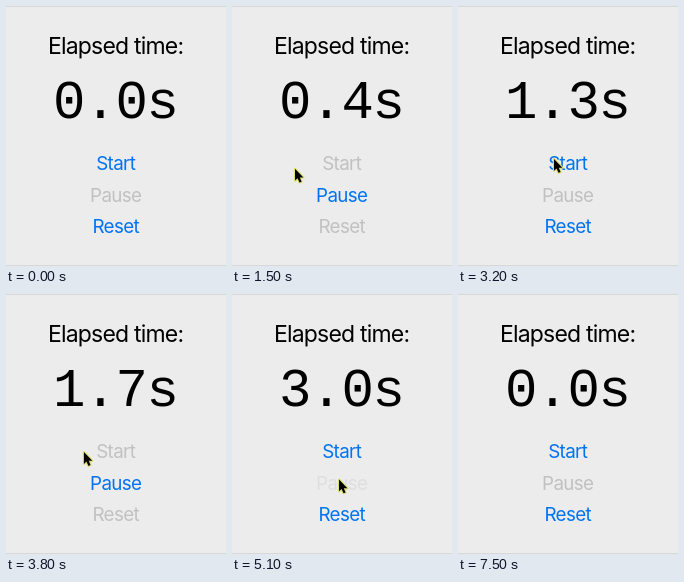
An HTML page for the animation above (7600 ms loop, 220 by 260 pixels).

```html
<!DOCTYPE html>
<html lang="en">
<head>
<meta charset="utf-8">
<title>Stopwatch</title>
<style>
  html, body { margin: 0; width: 100%; height: 100%; overflow: hidden; background: #ececec; }
  svg { display: block; width: 100%; height: 100%; }
  text { font-family: Inter, Roboto, sans-serif; font-optical-sizing: none; text-anchor: middle; }
  #title { font-size: 23px; letter-spacing: -0.8px; }
  #time { font-family: "Liberation Mono", "DejaVu Sans Mono", monospace; font-size: 54px; letter-spacing: -1.2px; }
  .button { font-size: 18.8px; letter-spacing: -0.65px; }
</style>
</head>
<body>
<svg viewBox="0 0 220 260">
  <rect width="220" height="260" fill="#ececec"/>
  <path d="M0 .5H220M0 259.5H220" stroke="#d8d8d8"/>
  <text id="title" x="109.6" y="48">Elapsed time:</text>
  <text id="time" x="109.4" y="112.3">0.0s</text>
  <text id="start" class="button" x="109.7" y="164">Start</text>
  <text id="pause" class="button" x="109.7" y="195.5">Pause</text>
  <text id="reset" class="button" x="109.7" y="227">Reset</text>
  <path id="cursor" d="M0 0V11.8L2.6 9.5 4.5 13.8 6.6 12.9 4.8 8.7H8.4Z"
        stroke="#dfdf70" stroke-width="2.2" stroke-linejoin="round" paint-order="stroke"/>
</svg>
<script>
const LOOP = 7600, STEP = 100;
const BLUE = '#0073f2', GRAY = '#c1c1c1';
const PRESS = 100, FADE = 400, PRESSED_OPACITY = 0.2;
const LEAVE_AFTER = 100, ARRIVE_BEFORE = 350;

// Pointer visits: release time, place, and how far the way there bows to the left.
const visits = [
  { at: 250, x: -18, y: 172 },
  { button: 'start', at: 1100, x: 98, y: 155, bow: 0 },
  { button: 'pause', at: 2450, x: 100, y: 185, bow: 41 },
  { button: 'start', at: 3400, x: 96, y: 153, bow: 8 },
  { button: 'pause', at: 5050, x: 107, y: 185.5, bow: 28 },
  { button: 'reset', at: 6050, x: 102, y: 225, bow: 28 },
  { at: 7050, x: -18, y: 190, bow: 0 }
];

const $ = id => document.getElementById(id);
const clamp01 = v => Math.min(1, Math.max(0, v));
const smooth = k => k * k * (3 - 2 * k);

function pointerAt(t) {
  const i = Math.max(1, visits.findLastIndex(v => t >= v.at + LEAVE_AFTER) + 1);
  const from = visits[i - 1], to = visits[i];
  if (!to) return [from.x, from.y];
  const leave = from.at + LEAVE_AFTER, arrive = to.at - ARRIVE_BEFORE;
  const k = clamp01((t - leave) / (arrive - leave)), s = smooth(k);
  return [
    from.x + (to.x - from.x) * s - to.bow * Math.sin(Math.PI * k),
    from.y + (to.y - from.y) * s
  ];
}

// Replays the clicks made so far.
function stopwatchAt(t) {
  let elapsed = 0, startedAt = null;
  for (const { button, at } of visits) {
    if (at > t) break;
    if (button === 'start') startedAt = at;
    if (button === 'pause') { elapsed += at - startedAt; startedAt = null; }
    if (button === 'reset') elapsed = 0;
  }
  const running = startedAt !== null;
  return { running, elapsed: running ? elapsed + t - startedAt : elapsed };
}

function opacityAt(id, t) {
  const click = visits.find(v => v.button === id && t >= v.at - PRESS && t < v.at + FADE);
  return click ? PRESSED_OPACITY + (1 - PRESSED_OPACITY) * clamp01((t - click.at) / FADE) : 1;
}

function setButton(id, enabled, t) {
  $(id).setAttribute('fill', enabled ? BLUE : GRAY);
  $(id).setAttribute('opacity', opacityAt(id, t));
}

function draw(now) {
  const t = Math.floor(now % LOOP / STEP) * STEP;
  const { running, elapsed } = stopwatchAt(t);
  $('time').textContent = (Math.floor(elapsed / 100) / 10).toFixed(1) + 's';
  setButton('start', !running, t);
  setButton('pause', running, t);
  setButton('reset', !running, t);
  $('cursor').setAttribute('transform', `translate(${pointerAt(t)})`);
}

const begin = performance.now();
function tick() {
  draw(performance.now() - begin);
  requestAnimationFrame(tick);
}
tick();
</script>
</body>
</html>
```
